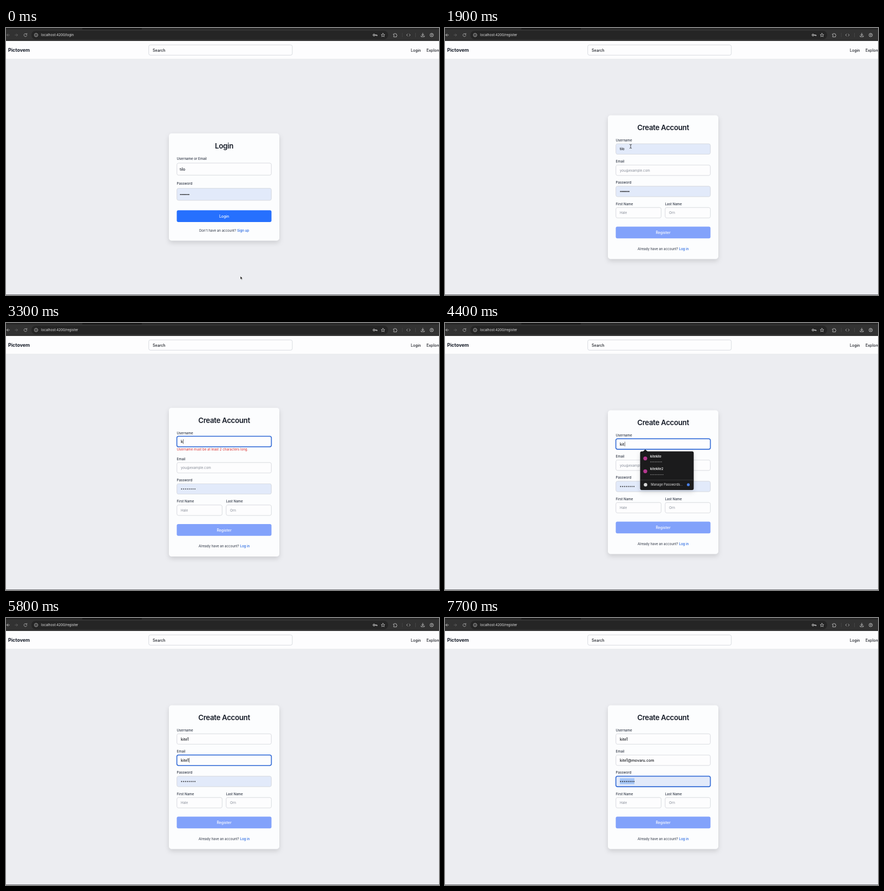
Recreate the animation shown at these times as an HTML page. Size 800x494 px, loop 8 s.

```html
<!DOCTYPE html>
<html lang="en">
<head>
<meta charset="utf-8">
<title>Sign up form</title>
<style>
  html, body { margin: 0; width: 100%; height: 100%; overflow: hidden; background: #ecedf1; }
  svg { display: block; width: 800px; height: 494px; }
  text { font-family: Inter, "Liberation Sans", sans-serif; white-space: pre; }
  .card { filter: drop-shadow(0 4px 4px rgba(0, 0, 0, .13)); }
  .field { filter: drop-shadow(0 .6px .5px rgba(0, 0, 0, .12)); }
</style>
</head>
<body>
<svg id="stage" viewBox="0 0 800 494"></svg>
<script>
const LOOP = 8000, TICK = 100;
const INK = '#141a26', BLUE = '#1f63e0', AUTOFILL = '#e2eafa', HINT = '#858b96';
const stage = document.getElementById('stage');

// Each entry changes part of the state from its time on.
const steps = [
  [0, { page: 'login', user: 'tilo', email: '', filled: false, fresh: true, error: '', focus: '', popup: 0, pick: '' }],
  [1000, { page: 'register', user: '' }],
  [1200, { user: 'tilo', filled: true }],
  [2100, { focus: 'user', fresh: false, popup: 3 }],
  [2200, { pick: 'user' }],
  [2400, { user: '', filled: false, pick: '', error: 'Username is required.' }],
  [3200, { user: 'k', popup: 0, error: 'Username must be at least 2 characters long.' }],
  [3500, { user: 'ki', error: '' }],
  [3600, { user: 'kite' }],
  [4100, { user: 'kite1' }],
  [4300, { user: 'kite' }],
  [4400, { user: 'kit', popup: 2 }],
  [4700, { user: 'kite' }],
  [4800, { user: 'kite1', popup: 0 }],
  [5000, { focus: 'email' }],
  [7500, { focus: 'password', pick: 'password' }]
];
const EMAIL = 'kite1@movaru.com';
const keyTimes = [5300, 5400, 5500, 5600, 5800, 5900, 6000, 6300, 6400, 6500, 6700, 6800, 7000, 7000, 7200, 7300];
const logins = ['tilo', 'kitekite', 'kitekite2'];

// Pointer path: time, x, y
const path = [[0, 433, 459], [200, 434, 458], [700, 437, 374], [1200, 437, 374], [1900, 343, 219], [3200, 343, 220]];

function stateAt(t) {
  const s = Object.assign({}, ...steps.filter(([at]) => at <= t).map(([, change]) => change));
  s.email = EMAIL.slice(0, keyTimes.filter(at => at <= t).length);
  return s;
}

function pointerAt(t) {
  const i = path.findIndex(p => p[0] > t);
  if (i < 1) return null;
  const [t0, x0, y0] = path[i - 1], [t1, x1, y1] = path[i];
  const k = (t - t0) / (t1 - t0), e = k * k * (3 - 2 * k);
  return [x0 + (x1 - x0) * e, y0 + (y1 - y0) * e];
}

const rect = (x, y, w, h, fill, r = 0, more = '') =>
  `<rect x="${x}" y="${y}" width="${w}" height="${h}" rx="${r}" fill="${fill}" ${more}/>`;
const disc = (x, y, r, fill) => `<circle cx="${x}" cy="${y}" r="${r}" fill="${fill}"/>`;
const line = (d, color, width = 1) =>
  `<path d="${d}" fill="none" stroke="${color}" stroke-width="${width}" stroke-linecap="round" stroke-linejoin="round"/>`;
const text = (x, y, str, size, { weight = 400, fill = INK, anchor = 'start', more = '' } = {}) =>
  `<text x="${x}" y="${y + size * .36}" font-size="${size}" font-weight="${weight}" fill="${fill}" text-anchor="${anchor}" ${more}>${str}</text>`;
const dots = (x, y, n, gap, r, fill) =>
  Array.from({ length: n }, (_, i) => disc(x + i * gap, y, r, fill)).join('');
const label = (x, y, str) => text(x, y, str, 6.15, { weight: 450, fill: '#303846' });
const title = str => y => text(403, y, str, 13.3, { weight: 600, anchor: 'middle', more: 'letter-spacing="-.33"' });
const footer = (y, ask, link) =>
  text(403, y, `${ask} <tspan fill="${BLUE}" font-weight="500">${link}</tspan>`, 6.15, { anchor: 'middle', fill: '#2d3543' });
const button = (y, str, fill) =>
  rect(315.5, y, 175, 21.7, fill, 3) + text(403, y + 11, str, 6.9, { weight: 500, fill: '#fff', anchor: 'middle' });

function field(x, y, w, h, { focus, filled } = {}) {
  const fill = filled ? AUTOFILL : '#fdfdfe';
  if (!focus) return rect(x, y, w, h, fill, 3, 'class="field" stroke="#d3d6dc" stroke-width=".7"');
  return rect(x - .5, y - .5, w + 1, h + 1, '#a9c6f7', 3.6, 'stroke="#a9c6f7" stroke-width="1.6"') +
    rect(x, y, w, h, fill, 3, 'stroke="#255fd0" stroke-width="1.3"');
}

function browser(s) {
  const gray = '#b9b9b9';
  const arrow = (x, dir, color) => line(`M${x - 2.5 * dir} 13h${5 * dir}m${-2.3 * dir} -2.3l${2.3 * dir} 2.3l${-2.3 * dir} 2.3`, color, .8);
  return rect(0, 0, 800, 24, '#323232') + rect(0, 0, 800, 2.5, '#252525') + rect(141, 0, 110, 2.5, '#161616') +
    rect(47, 5, 659, 16, '#252525', 8) +
    arrow(4, -1, s.page === 'login' ? '#777' : '#d0d0d0') + arrow(19, 1, '#686868') +
    line('M38.3 11.6a2.8 2.8 0 1 0 .4 2M38.6 10v1.8h-1.8', gray, .8) +
    line('M58.8 13a3.2 3.2 0 1 0-6.4 0a3.2 3.2 0 1 0 6.4 0M55.6 12.7v1.8M55.6 11.3v.1', '#ddd', .7) +
    text(65, 13.2, `localhost:4200/${s.page}`, 6.2, { fill: '#e4e4e4' }) +
    line('M681.7 13a1.8 1.8 0 1 0-3.6 0a1.8 1.8 0 1 0 3.6 0h4v1.5M684 13v1.3M679.8 13h.2', '#ddd', .9) +
    line('M696.5 9.8l1 2.2 2.4.2-1.8 1.6.6 2.4-2.2-1.3-2.2 1.3.6-2.4-1.8-1.6 2.4-.2z', '#ddd', .7) +
    line('M716.2 11h1.6a1 1 0 0 1 2 0h1.7v1.7a1 1 0 0 1 0 2v1.8h-5.3v-1.8a1 1 0 0 0 0-2z', gray, .9) +
    line('M732.2 9.5v7M756.5 9.5v7', '#555', .6) +
    line('M742 11l-2 2 2 2M745 11l2 2-2 2', gray, .8) +
    line('M770 9.5v4.5m-2-2l2 2 2-2M767 14.5v1.6h6v-1.6', '#ddd', .8) +
    line('M789.8 13a3.3 3.3 0 1 0-6.6 0a3.3 3.3 0 1 0 6.6 0M787.8 12a1.3 1.3 0 1 0-2.6 0a1.3 1.3 0 1 0 2.6 0M784.3 15.3q2.2-1.8 4.4 0', '#ccc', .7);
}

function header() {
  const dark = { fill: '#15181f', weight: 450 };
  return rect(0, 24, 800, 33.5, '#fdfdfe') + rect(0, 57.3, 800, .6, '#e3e4e8') +
    text(4, 41.3, 'Pictovem', 8.8, { weight: 650 }) +
    rect(263.7, 31.3, 265.3, 19, '#fdfdfe', 3.2, 'stroke="#cfd2d8" stroke-width=".8"') +
    text(271, 41.2, 'Search', 7, dark) + text(748, 41.2, 'Login', 7, dark) + text(777, 41.2, 'Explore', 7, dark) +
    rect(0, 493, 800, 1, '#6d6e72');
}

const card = (y, h) => rect(301, y, 204, h, '#fcfdfe', 5, 'class="card"');

function loginPage(s) {
  return card(195, 198.5) + title('Login')(218) +
    label(315.5, 241.5, 'Username or Email') + field(315.8, 250, 174.4, 22.2) +
    text(321, 261.3, s.user, 7, { weight: 500 }) +
    label(315.5, 288, 'Password') + field(315.8, 296.6, 174.4, 22.2, { filled: true }) +
    dots(322.4, 308.2, 8, 2.2, .9, '#111') +
    button(337.3, 'Login', '#2670fe') + footer(374.7, "Don't have an account?", 'Sign up');
}

function value(name, y, str, hint, small) {
  return str
    ? text(323, y, str, small ? 5.9 : 7, { weight: small ? 500 : 450, fill: '#101318', more: `id="${name}"` })
    : text(323, y, hint, 6.2, { fill: HINT });
}

function registerPage(s) {
  const up = s.error ? -4.6 : 0, down = -up;
  const input = (name, y) =>
    field(315.8, y, 174.4, 19.2, { focus: s.focus === name, filled: name === 'password' || name === 'user' && s.filled });
  const half = (x, name, hint) =>
    label(x - .3, 325.5 + down, name) + field(x, 332.2 + down, 83.5, 19.2) + text(x + 7.2, 341.9 + down, hint, 6.2, { fill: HINT });
  const marked = y => rect(323, y - 5.5, 27, 11, '#a5c5f5');
  return card(161.5 + up, 266 + 2 * down) + title('Create Account')(184.5 + up) +
    label(315.5, 208 + up, 'Username') + input('user', 214.3 + up) +
    (s.pick === 'user' ? rect(323, 218.5, 13, 11, '#a5c5f5') : '') +
    value('user', 224 + up, s.user, 'yourusername', s.fresh) +
    text(315.5, 233.5, s.error, 6.15, { fill: '#d92a2a' }) +
    label(315.5, 247 + down, 'Email') + input('email', 253.6 + down) +
    value('email', 263.3 + down, s.email, 'you@example.com') +
    label(315.5, 286.2 + down, 'Password') + input('password', 292.8 + down) +
    (s.pick === 'password' ? marked(302) : '') +
    dots(324.4, 302.5 + down, 8, s.fresh ? 2.2 : 3.52, .9, '#111') +
    half(315.8, 'First Name', 'Hale') + half(406.8, 'Last Name', 'Orn') +
    button(367.5 + down, 'Register', '#82a2fb') + footer(408.3 + down, 'Already have an account?', 'Log in') +
    (s.popup ? popup(237.6 + up, logins.slice(-s.popup)) : '');
}

function popup(top, names) {
  const h = 23.7 * names.length + 24, end = top + h;
  const rows = names.map((name, i) => {
    const y = top + 23.7 * i;
    return disc(370, y + 13, 3.6, '#b5378f') +
      text(379, y + 9, name, 5.9, { weight: 600, fill: '#f0f0f0' }) +
      dots(380, y + 19.3, name.length < 8 ? 8 : name.length, 2.85, .6, '#ddd');
  }).join('');
  return rect(360.5, top, 99, h, '#1b1b1c', 3, 'class="card"') +
    `<path d="M365.5 ${top + .5}l4.5-4 4.5 4z" fill="#1b1b1c"/>` + rows +
    rect(360.5, end - 19, 99, .6, '#4a4a4c') +
    disc(370.5, end - 9.8, 3.2, '#d5d5d5') +
    text(380.3, end - 9.7, 'Manage Passwords...', 5.85, { fill: '#e2e2e2' }) +
    disc(449.5, end - 9.8, 2.6, '#4a80e8');
}

function pointer(s, t) {
  const at = pointerAt(t);
  if (!at) return '';
  const [x, y] = at;
  const shape = (d, fill, edge) => `<path d="${d}" fill="${fill}" stroke="${edge}" stroke-width=".6" stroke-linejoin="round"/>`;
  if (s.page === 'register' && y < 234)
    return line(`M${x - 1.7} ${y - 3.5}q1.7 0 1.7 1q0-1 1.7-1M${x} ${y - 2.5}v5m-1.7 1q1.7 0 1.7-1q0 1 1.7 1`, '#222', .8);
  if (s.page === 'login' && y < 380)
    return shape(`M${x - .8} ${y}q.8-1 1.6 0v2.6l3 .7q.7.3.5 1.2l-.7 3.5h-3.8l-2.8-3.6q.3-1 1.3-.3l.9.7z`, '#fff', '#111');
  return shape(`M${x} ${y}v6.3l1.5-1.4 1 2.3 1-.5-1-2.1h2z`, '#111', '#fff');
}

// The caret follows the measured end of the typed text.
function addCaret(s) {
  const node = s.focus && !s.pick && document.getElementById(s.focus);
  if (!node) return;
  const box = node.getBBox();
  stage.insertAdjacentHTML('beforeend', rect(box.x + box.width + .2, box.y + box.height / 2 - 4.4, .6, 8.6, '#111'));
}

function draw(t) {
  const s = stateAt(t);
  stage.innerHTML = header() + browser(s) + (s.page === 'login' ? loginPage(s) : registerPage(s)) + pointer(s, t);
  addCaret(s);
}

let shown = -1;
function frame() {
  const t = Math.floor(performance.now() % LOOP / TICK) * TICK;
  if (t !== shown) draw(shown = t);
  requestAnimationFrame(frame);
}
frame();
</script>
</body>
</html>
```
